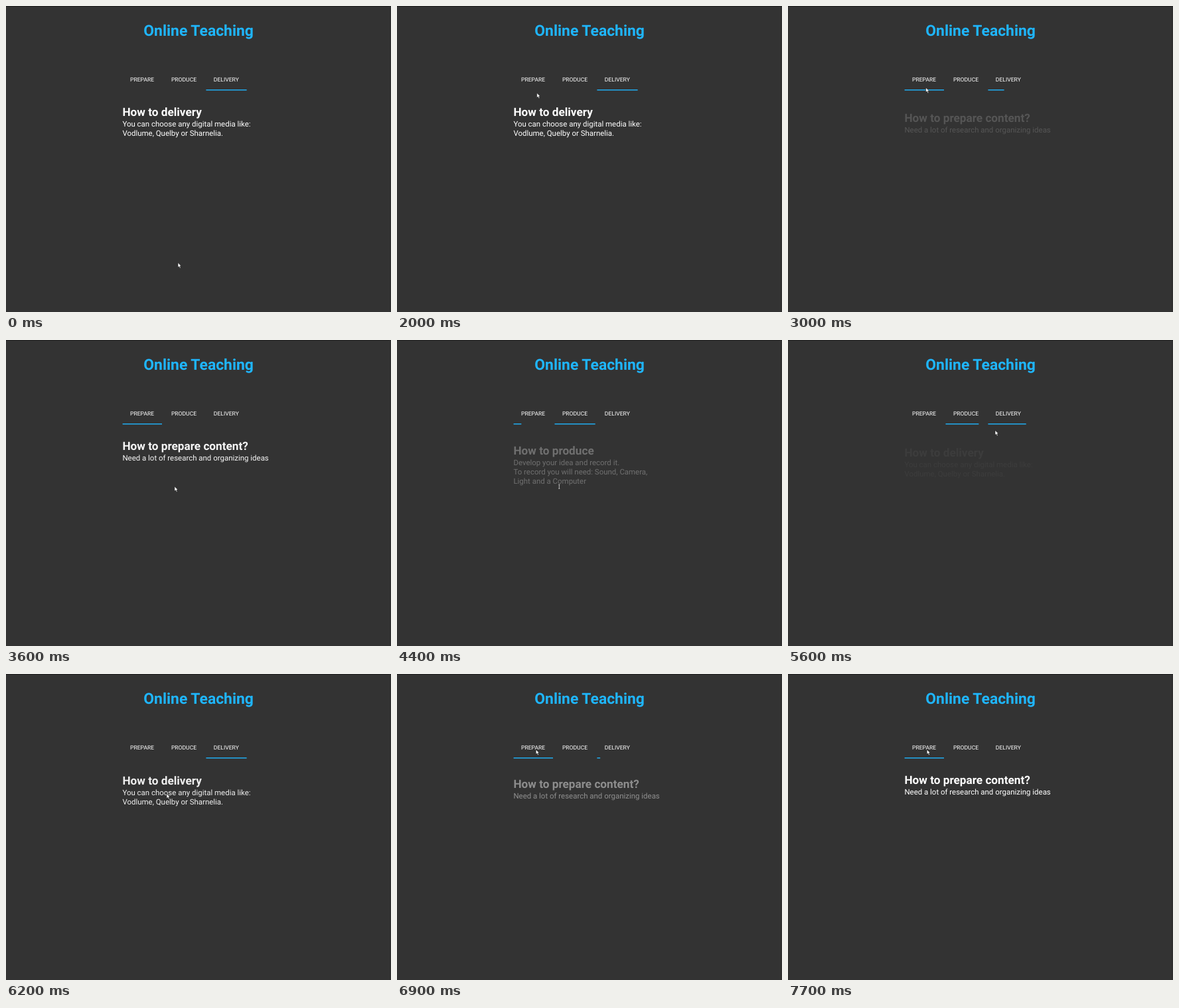
These frames come from a looping animation (580 px wide and 462 px high, 7800 ms). An HTML page:

```html
<!DOCTYPE html>
<html lang="en">
<head>
<meta charset="utf-8">
<title>Online Teaching</title>
<style>
  html, body { margin: 0; width: 100%; height: 100%; overflow: hidden; background: #333; }
  svg { display: block; width: 580px; height: 462px; font: 11.46px Roboto, sans-serif; fill: #fff; }
  text { text-rendering: geometricPrecision; }
  .title { font-size: 22.92px; font-weight: 700; fill: #1fb6ff; }
  .head { font-size: 17.19px; font-weight: 700; }
  .tab { font-size: 8.59px; }
  .bar { fill: #1fb6ff; }
</style>
</head>
<body>
<svg viewBox="0 0 580 462">
  <rect width="580" height="462" fill="#333"/>
  <rect width="580" height="1" fill="#1e1e1e"/>
  <rect x="578" width="1" height="462" fill="#2d2d2d"/>
  <text class="title" x="207.3" y="45">Online Teaching</text>

  <g class="tab" transform="translate(175.6 0)">
    <text x="11.4" y="114.3">PREPARE</text>
    <rect class="bar" y="126.1" width="59.4" height="1.4"/>
  </g>
  <g class="tab" transform="translate(237.5 0)">
    <text x="11.4" y="114.3">PRODUCE</text>
    <rect class="bar" y="126.1" width="61.2" height="1.4"/>
  </g>
  <g class="tab" transform="translate(301.4 0)">
    <text x="11.4" y="114.3">DELIVERY</text>
    <rect class="bar" y="126.1" width="61.2" height="1.4"/>
  </g>

  <g class="panel">
    <text class="head" x="175.4" y="165.9">How to prepare content?</text>
    <text x="175.4" y="181.9">Need a lot of research and organizing ideas</text>
  </g>
  <g class="panel">
    <text class="head" x="175.4" y="165.9">How to produce</text>
    <text x="175.4" y="181.9">Develop your idea and record it.</text>
    <text x="175.4" y="195.9">To record you will need: Sound, Camera,</text>
    <text x="175.4" y="209.9">Light and a Computer</text>
  </g>
  <g class="panel">
    <text class="head" x="175.4" y="165.9">How to delivery</text>
    <text x="175.4" y="181.9">You can choose any digital media like:</text>
    <text x="175.4" y="195.9">Vodlume, Quelby or Sharnelia.</text>
  </g>

  <g id="pointer">
    <path id="arrow" d="M0 0V7.2L1.7 5.7L3 8.5L4.3 7.9L3.1 5.2H5.2Z" stroke="#151515" stroke-width=".6"/>
    <path id="beam" d="M-1 -3H1M0 -3V3M-1 3H1" fill="none" stroke="#ddd" stroke-width=".8"/>
  </g>
</svg>
<script>
const LOOP = 7800, STEP = 100;
const BAR_MS = 400, FADE_MS = 1000, RISE = 10.74;
const all = s => [...document.querySelectorAll(s)];
const bars = all('.bar'), panels = all('.panel');
const [pointer, arrow, beam] = ['pointer', 'arrow', 'beam'].map(id => document.getElementById(id));

// A tab's bar grows on hover; its panel fades in on click.
const visits = [
  { tab: 2, hover: -LOOP, click: -LOOP },
  { tab: 0, hover: 2150, click: 2860 },
  { tab: 1, hover: 4010, click: 4200 },
  { tab: 2, hover: 5324, click: 5540 },
  { tab: 0, hover: 6380, click: 6635 }
];

// Places the pointer heads for: arrival, departure, x, y
const stops = [
  { from: 0, to: 950, x: 259, y: 387.5 },
  { from: 1300, to: 1300, x: 302, y: 340 },
  { from: 1800, to: 1800, x: 212.5, y: 136 },
  { from: 2600, to: 2860, x: 201, y: 106 },
  { from: 3480, to: 3480, x: 252, y: 238 },
  { from: 4000, to: 4200, x: 266, y: 113 },
  { from: 4530, to: 4530, x: 233, y: 278 },
  { from: 5350, to: 5500, x: 317, y: 112 },
  { from: 5900, to: 5900, x: 285, y: 268 },
  { from: 6450, to: LOOP, x: 209.2, y: 114 }
];

const clamp = x => Math.min(1, Math.max(0, x));
const smooth = x => x * x * (3 - 2 * x);
const mix = (a, b, k) => a + (b - a) * k;
const cubic = (a, b, u) => 3 * a * u * (1 - u) ** 2 + 3 * b * u * u * (1 - u) + u ** 3;

// CSS "ease" timing
function ease(x) {
  let lo = 0, hi = 1;
  for (let i = 0; i < 24; i++) {
    const mid = (lo + hi) / 2;
    if (cubic(.25, .25, mid) < clamp(x)) lo = mid; else hi = mid;
  }
  return cubic(.1, 1, (lo + hi) / 2);
}

function barScale(tab, t) {
  const i = visits.findLastIndex(v => v.tab === tab && v.hover <= t);
  if (i < 0) return 0;
  const left = visits[i + 1]?.click ?? LOOP;
  return ease((t - visits[i].hover) / BAR_MS) * (1 - ease((t - left) / BAR_MS));
}

function pointerAt(t) {
  const i = stops.findLastIndex(s => s.from <= t);
  const a = stops[i], b = stops[i + 1] ?? a;
  const k = b === a ? 0 : smooth(clamp((t - a.to) / (b.from - a.to)));
  return [mix(a.x, b.x, k), mix(a.y, b.y, k)];
}

function draw(t) {
  bars.forEach((bar, i) => bar.setAttribute('transform', `scale(${barScale(i, t)} 1)`));

  const { tab, click } = visits.findLast(v => v.click <= t);
  const k = ease((t - click) / FADE_MS);
  panels.forEach((panel, i) => {
    panel.setAttribute('opacity', i === tab ? k : 0);
    panel.setAttribute('transform', `translate(0 ${RISE * (1 - k)})`);
  });

  const [x, y] = pointerAt(t);
  pointer.setAttribute('transform', `translate(${x} ${y})`);
  // The long panel's last line turns the pointer into a text beam.
  const overText = tab === 1 && y > 200 && y < 225;
  arrow.setAttribute('visibility', overText ? 'hidden' : 'visible');
  beam.setAttribute('visibility', overText ? 'visible' : 'hidden');
}

function tick() {
  const t = performance.now() % LOOP;
  draw(Math.floor(t / STEP) * STEP);
  requestAnimationFrame(tick);
}
draw(0);
requestAnimationFrame(tick);
</script>
</body>
</html>
```
